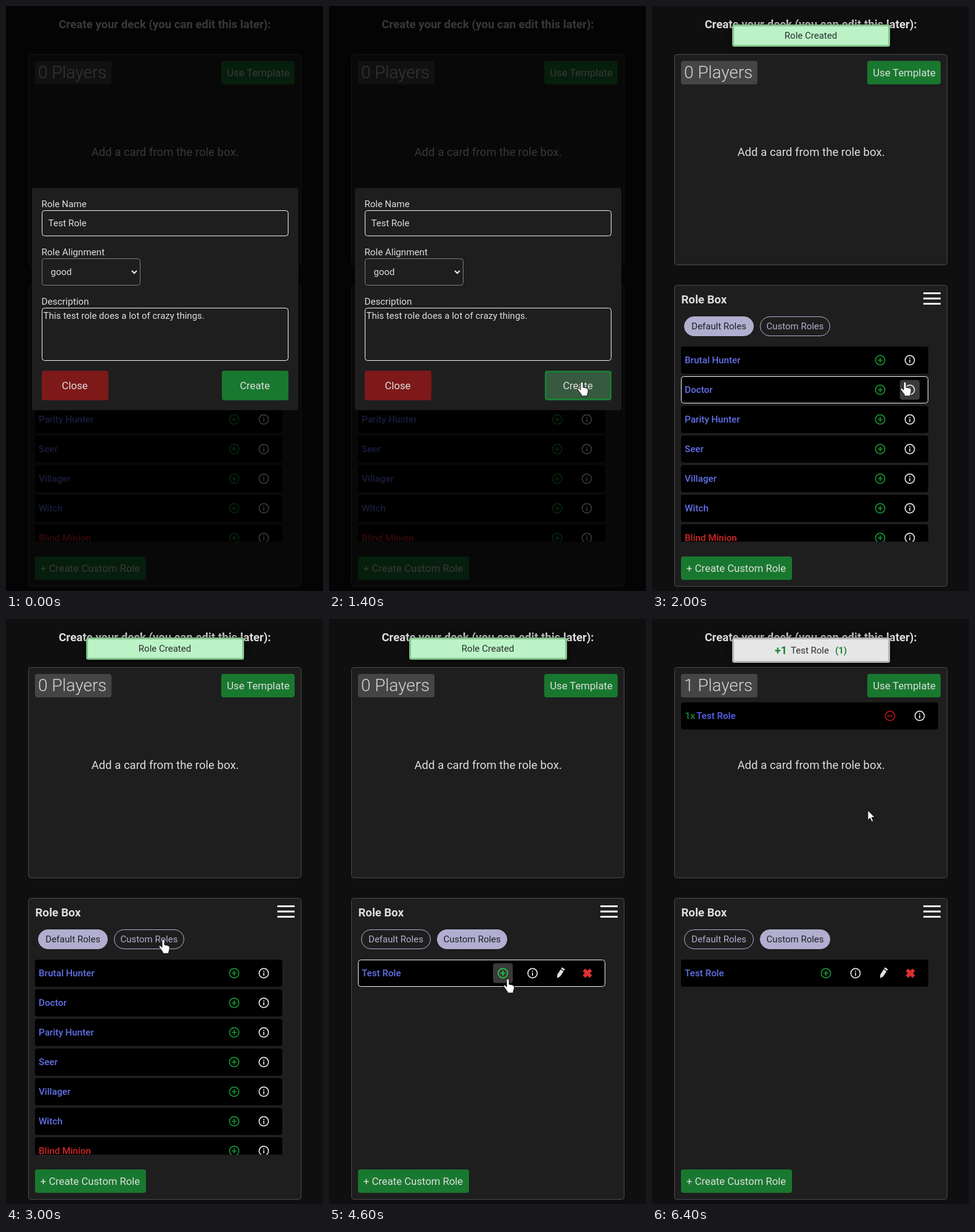
Write an HTML page that moves like this. It is 514x948 px and loops after 7.2 s.

```html
<!DOCTYPE html>
<html lang="en">
<head>
<meta charset="utf-8">
<title>Create a custom role</title>
<style>
  html, body { margin: 0; width: 100%; height: 100%; overflow: hidden; background: #0f0f10; }
  svg { display: block; width: 100vw; height: 100vh; }
  text { font: 15px Roboto, "Open Sans", sans-serif; fill: #dedede; }
  .mid { font-size: 16.7px; }
  .big { font-size: 18.6px; }
  .count { font-size: 27.8px; font-weight: 300; fill: #d6d6d6; }
  .bold { font-weight: 700; }
  .center { text-anchor: middle; }
  .panel { fill: #1e1e1e; stroke: #4b4b4b; }
  .green { fill: #19782f; }
  .field { fill: none; stroke: #f2f2f2; }
  .name { font-size: 15.2px; font-weight: 500; }
  .good { fill: #6270e8; }
  .evil { fill: #d22626; }
  .icon { fill: none; stroke: #e2e2e2; stroke-width: 1.7; }
  .plus { stroke: #159334; }
  .minus { stroke: #b01414; }
  .hot { opacity: 0; }
  .hot.over { opacity: 1; }
  .hot.over + .plus { stroke: #1fce45; }
  .outline { fill: none; stroke: #f0f0f0; }
  .shade { fill: #3a3a3a; }
  .pill rect { fill: none; stroke: #b1aecf; }
  .pill text { fill: #b1aecf; }
  .pill.active rect { fill: #b1aecf; }
  .pill.active text { fill: #202026; }
  .toast { filter: drop-shadow(0 1px 6px #000c); }
  .toast rect { stroke-width: 3; }
  .toast text { fill: #2b2f2c; }
  .toast .gain { fill: #1d8738; font-weight: 700; }
  #cursor path { fill: #fff; stroke: #111; stroke-linejoin: round; }
</style>
</head>
<body>
<svg viewBox="0 0 514 948" preserveAspectRatio="none">
  <defs><clipPath id="listClip"><rect x="40" y="545" width="430" height="323"/></clipPath></defs>
  <rect width="514" height="948" fill="#0f0f10"/>
  <text class="big bold center" x="257.5" y="36">Create your deck (you can edit this later):</text>

  <rect class="panel" x="36.5" y="78.5" width="442" height="341" rx="4"/>
  <rect x="47" y="89" width="124" height="38" rx="4" fill="#454545"/>
  <text class="count" x="52" y="117" data-on="0 4700">0 Players</text>
  <text class="count" x="52" y="117" data-on="4700 7200">1 Players</text>
  <rect class="green" x="349" y="89" width="119" height="38" rx="4"/>
  <text class="mid center" x="409" y="114">Use Template</text>
  <text class="big center" x="258" y="243">Add a card from the role box.</text>
  <g id="deck" data-on="4700 7200"></g>

  <rect class="panel" x="36.5" y="452.5" width="442" height="488" rx="4"/>
  <text class="big bold" x="47.5" y="482">Role Box</text>
  <path d="M440 465.5h28m-28 8.5h28m-28 8.5h28" stroke="#efefef" stroke-width="3"/>
  <g class="pill" id="defaultTab">
    <rect x="52.5" y="503.5" width="112" height="31" rx="15.5"/>
    <text class="center" x="108.5" y="524">Default Roles</text>
  </g>
  <g class="pill" id="customTab">
    <rect x="175.5" y="503.5" width="113" height="31" rx="15.5"/>
    <text class="center" x="232" y="524">Custom Roles</text>
  </g>
  <rect class="hot hand" x="175" y="503" width="114" height="32" fill="none"/>
  <g clip-path="url(#listClip)">
    <g id="defaultRoles" data-on="0 3400"></g>
    <g id="customRoles" data-on="3400 7200"></g>
  </g>
  <rect class="green" x="47" y="892" width="180" height="38" rx="4"/>
  <text class="mid center" x="136.5" y="917">+ Create Custom Role</text>

  <g id="modal" data-on="0 1700">
    <rect width="514" height="948" opacity=".75"/>
    <rect x="42" y="295" width="432" height="360" rx="4" fill="#1e1e1e"/>
    <text x="57.5" y="326">Role Name</text>
    <rect class="field" x="58.5" y="331.5" width="399" height="41" rx="4"/>
    <text x="68.5" y="357">Test Role</text>
    <text x="57.5" y="404" style="font-size:15.2px">Role Alignment</text>
    <rect class="field" x="58.5" y="409.5" width="159" height="43" rx="4" style="stroke:#808080"/>
    <text x="72.5" y="436">good</text>
    <path d="M204 429l4 4 4-4" fill="none" stroke="#eee" stroke-width="2"/>
    <text x="57.5" y="484" style="font-size:15.2px">Description</text>
    <rect class="field" x="58.5" y="489.5" width="399" height="85" rx="4"/>
    <text x="60.5" y="507">This test role does a lot of crazy things.</text>
    <rect x="58" y="591" width="108" height="48" rx="4" fill="#7d1919"/>
    <text class="mid center" x="111.5" y="621">Close</text>
    <rect class="green" x="350" y="591" width="108" height="48" rx="4"/>
    <rect class="hot hand" x="351.5" y="592.5" width="105" height="45" rx="3" fill="#36593f" stroke="#1b7c33" stroke-width="3"/>
    <text class="mid center" x="403.5" y="621">Create</text>
  </g>

  <g class="toast" data-on="1700 4700">
    <rect x="131.5" y="31.5" width="253" height="33" rx="2" fill="#bbf3c7" stroke="#86c48e"/>
    <text class="center" x="257.5" y="53">Role Created</text>
  </g>
  <g class="toast" data-on="4700 7200">
    <rect x="131.5" y="31.5" width="253" height="38" rx="2" fill="#e7e6e7" stroke="#b5b5b5"/>
    <text class="gain" x="199" y="57" style="font-size:18px">+1</text>
    <text x="225" y="56">Test Role</text>
    <text class="gain" x="297" y="56">(1)</text>
  </g>

  <g id="cursor">
    <path id="arrow" d="M0 0v16l3.6-3.4 2.6 6 2.6-1.1-2.6-6h5z"/>
    <path id="hand" d="M-2 2q0-2 2-2t2 2v7q5 .5 7.3 2 1 .8 1 2.5 0 4-1.5 7v2.5h-9.5v-2l-6-8.5q-.8-2 1-2.3 1.7 0 3.7 3z"/>
  </g>
</svg>
<script>
  const LOOP = 7200, STEP = 100, TAB_SWITCH = 3400;
  const $ = id => document.getElementById(id);

  const glyphs = {
    plus: 'M-4 0h8M0-4v8',
    minus: 'M-4 0h8',
    info: 'M0-1v5M0-4v1.8',
  };
  const icon = (kind, x, y) =>
    `<g class="icon ${kind}" transform="translate(${x} ${y})"><circle r="7.6"/><path d="${glyphs[kind]}"/></g>`;
  const button = (kind, x, y) =>
    `<rect class="hot hand shade" x="${x - 16}" y="${y - 16}" width="32" height="32" rx="4"/>` + icon(kind, x, y);
  const pencil = (x, y) =>
    `<path transform="translate(${x} ${y}) rotate(33)" fill="#e2e2e2" d="M-2.8-9.5h5.6v2.8h-5.6zM-2.8-5.5h5.6v10l-2.8 5-2.8-5z"/>`;
  const cross = (x, y) =>
    `<path transform="translate(${x} ${y})" d="M-5.5-5.5l11 11m0-11l-11 11" stroke="#dc2f33" stroke-width="6"/>`;

  const bar = (y, width) => `<rect x="47" y="${y}" width="${width}" height="44" rx="4"/>`;
  const row = (y, name, side, controls) => bar(y, 401) +
    `<rect class="hot outline" x="47.5" y="${y + .5}" width="400" height="43" rx="4"/>
     <text class="name ${side}" x="53" y="${y + 27}">${name}</text>` + controls(y + 22);

  const roles = ['Brutal Hunter', 'Doctor', 'Parity Hunter', 'Seer', 'Villager', 'Witch', 'Blind Minion'];
  $('defaultRoles').innerHTML = roles.map((name, i) =>
    row(552 + i * 48, name, i < 6 ? 'good' : 'evil', y => button('plus', 370, y) + button('info', 418, y))).join('');
  $('customRoles').innerHTML = row(552, 'Test Role', 'good', y =>
    button('plus', 282, y) + button('info', 330, y) + pencil(375, y) + cross(419, y));
  $('deck').innerHTML = bar(135, 417) +
    `<text class="name bold" x="53.5" y="162" style="fill:#168a2d">1x</text>
     <text class="name" x="72" y="162" style="fill:#5663f2">Test Role</text>` +
    icon('minus', 386, 157) + icon('info', 434, 157);

  // Pointer stops: time, x, y
  const stops = [
    [600, 530, 716], [1400, 410, 609], [2200, 410, 609], [3000, 255, 519], [3700, 258, 523],
    [3800, 258, 523], [4300, 290, 583], [4900, 290, 583], [6200, 352, 306], [6400, 350, 310], [LOOP, 350, 310],
  ];
  function pointerAt(t) {
    const i = Math.max(1, stops.findIndex(s => s[0] >= t));
    const [t0, x0, y0] = stops[i - 1], [t1, x1, y1] = stops[i];
    const p = Math.max(0, (t - t0) / (t1 - t0)), e = p * p * (3 - 2 * p);
    return [x0 + (x1 - x0) * e, y0 + (y1 - y0) * e];
  }

  const timed = [...document.querySelectorAll('[data-on]')].map(el => {
    const [from, to] = el.dataset.on.split(' ').map(Number);
    return { el, from, to };
  });
  const hotspots = [...document.querySelectorAll('.hot')].map(el => {
    const [x, y, w, h] = ['x', 'y', 'width', 'height'].map(k => +el.getAttribute(k));
    return { el, x, y, w, h, hand: el.classList.contains('hand'), owner: el.closest('[data-on]') };
  });
  const show = (el, on) => { el.style.display = on ? '' : 'none'; };

  function render(t) {
    for (const { el, from, to } of timed) {
      show(el, t >= from && t < to);
      if (el.classList.contains('toast')) {
        const p = Math.min(1, Math.max(0, (t - from) / 300)), e = 1 - (1 - p) ** 2;
        el.setAttribute('transform', `translate(0 ${-20 * (1 - e)})`);
        el.style.opacity = e;
      }
    }
    $('defaultTab').classList.toggle('active', t < TAB_SWITCH);
    $('customTab').classList.toggle('active', t >= TAB_SWITCH);

    const [px, py] = pointerAt(t), modalOpen = $('modal').style.display !== 'none';
    let overButton = false;
    for (const { el, x, y, w, h, hand, owner } of hotspots) {
      const reachable = modalOpen ? owner === $('modal') : owner?.style.display !== 'none';
      const over = reachable && px >= x && px <= x + w && py >= y && py <= y + h;
      el.classList.toggle('over', over);
      overButton ||= over && hand;
    }
    show($('cursor'), t >= 700);
    show($('hand'), overButton);
    show($('arrow'), !overButton);
    $('cursor').setAttribute('transform', `translate(${px.toFixed(1)} ${py.toFixed(1)})`);
  }

  function tick() {
    render(Math.floor(performance.now() % LOOP / STEP) * STEP);
    requestAnimationFrame(tick);
  }
  tick();
</script>
</body>
</html>
```
